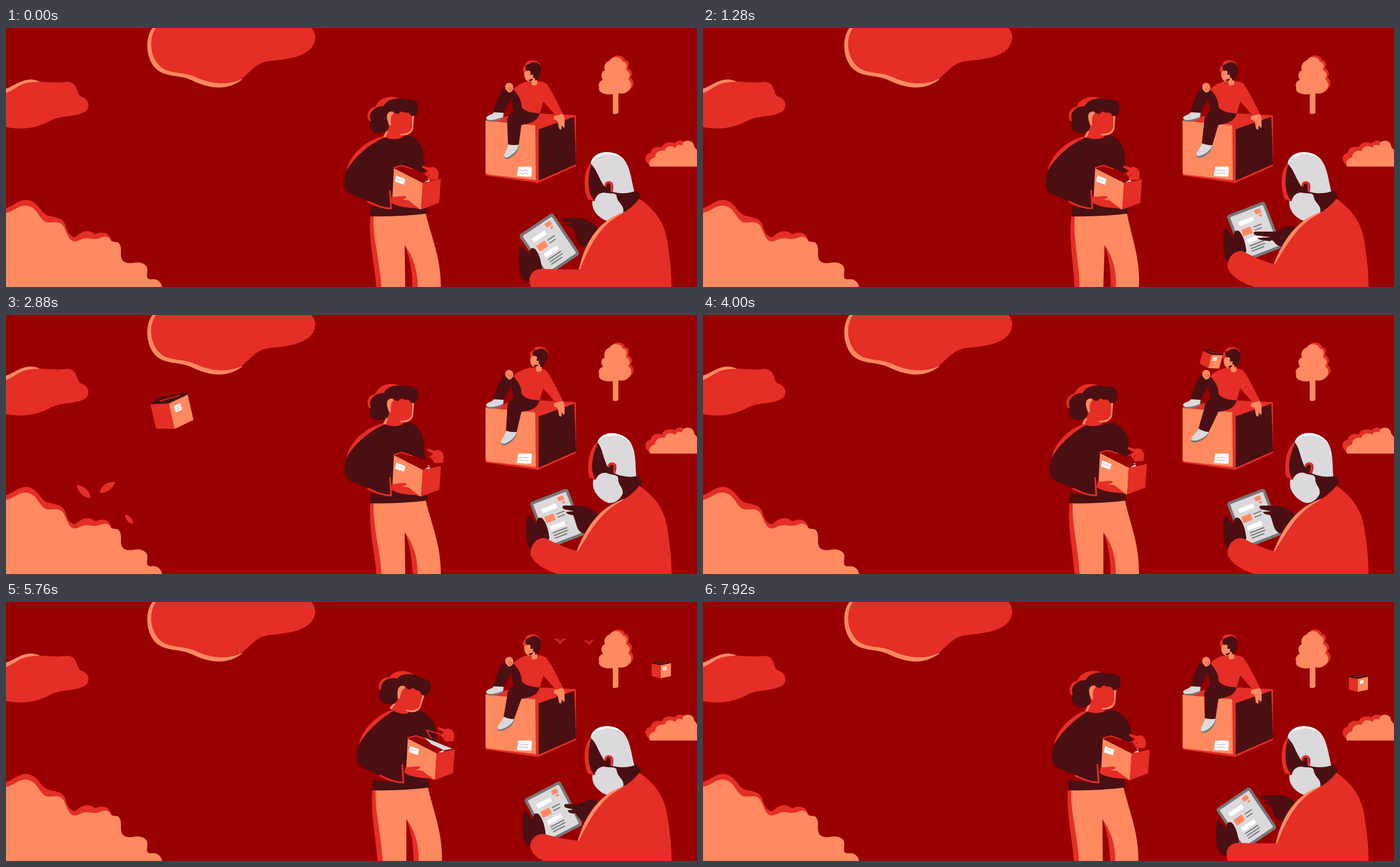
These frames come from a looping animation (1222 px wide and 458 px high, 8000 ms). An HTML page:

```html
<!DOCTYPE html>
<html lang="en">
<head>
<meta charset="utf-8">
<title>Parcels</title>
<style>
  html, body { margin: 0; width: 100%; height: 100%; overflow: hidden; background: #900; }
  svg { display: block; width: 100vw; height: 100vh; }
  .b { fill: #900; } .r { fill: #e52e25; } .p { fill: #ff8a60; } .d { fill: #4a0f12; }
  .g { fill: #dcd9dd; } .w { fill: #fff; } .s { fill: #777; }
  .line { fill: none; stroke-width: 2; stroke-linecap: round; stroke-linejoin: round; }
  .lr { stroke: #e52e25; } .lp { stroke: #ff8a60; } .ls { stroke: #777; } .lg { stroke: #aaa5aa; }
</style>
</head>
<body>
<svg viewBox="0 0 1222 458" preserveAspectRatio="none">
  <defs>
    <path id="canopy" d="M1072 117C1060 119 1046 114 1049 105C1046 98 1052 92 1056 92C1050 84 1054 76 1059 75C1056 66 1062 58 1068 58C1070 49 1088 49 1091 60C1098 60 1099 68 1096 74C1104 78 1105 86 1100 90C1107 96 1107 104 1103 108C1098 116 1090 117 1082 115Z"/>
    <path id="leaf" class="r" d="M-13 -12C-3 -11 11 -4 11 13C0 11 -11 3 -13 -12Z"/>
    <path id="bird" d="M-11 -3C-6 -5 -2 -3 0 0C2 -3 6 -5 11 -3C6 -2 4 3 0 5C-4 3 -6 -2 -11 -3Z" fill="#cf271f"/>
  </defs>

  <!-- clouds -->
  <path class="p" d="M259 0C245 18 247 55 265 72C282 88 308 82 330 93C355 105 388 114 418 91L300 0Z"/>
  <path class="r" d="M265 0C251 20 255 52 273 68C290 83 315 76 338 88C365 100 393 101 416 91C440 70 445 60 470 58C500 55 547 50 547 15C546 8 543 3 540 0Z"/>
  <path class="p" d="M0 107C15 103 25 91 45 91C55 92 62 96 66 97L0 120Z"/>
  <path class="r" d="M0 115C15 110 25 97 45 96C70 93 85 99 108 95C130 96 122 119 135 122C150 128 148 145 138 149C120 158 100 154 80 163C60 175 30 182 0 175Z"/>

  <g id="birds"><use href="#bird"/><use href="#bird"/></g>
  <g id="tree">
    <use href="#canopy" class="r" x="4" y="-3"/>
    <use href="#canopy" class="p"/>
    <path class="p" d="M1073 110H1083V150Q1078 154 1073 151Z"/>
  </g>
  <path class="r" d="M1140 243C1128 238 1128 222 1140 221C1142 208 1155 210 1160 211C1162 201 1178 201 1182 204C1190 195 1202 200 1202 206L1160 243Z"/>
  <path class="p" d="M1139 245C1134 236 1142 230 1148 229C1148 218 1158 216 1165 217C1168 207 1178 208 1184 212C1187 204 1192 207 1196 208C1196 196 1217 196 1217 210Q1220 213 1222 216V245Z"/>

  <!-- seated figure on the crate -->
  <path class="r" d="M848 163L920 150L1005 154Q1008 154 1008 157L1008 244L941 274L850 261Q847 261 848 257Z"/>
  <path class="p" d="M848 164L936 172L937 269L852 259Q848 258 848 254Z"/>
  <path class="d" d="M942 179L1005 157Q1007 200 1008 241L942 270Z"/>
  <path class="w" d="M906 245H928Q930 246 930 248L929 263L905 262Q903 262 904 259Z"/>
  <path class="line lg" d="M908 252q2 -2 4 0t4 0t4 0t4 0M908 257q2 -2 4 0t4 0t4 0t4 0" style="stroke-width:1"/>
  <path class="d" d="M880 107Q893 97 908 116L920 150L900 158L893 125L880 151L862 148C868 130 873 115 880 107Z"/>
  <path class="s" d="M850 162L880 153L879 160C868 166 852 168 850 162Z"/>
  <path class="g" d="M863 149L880 150L879 157C868 162 852 165 849 160C849 154 858 155 863 149Z"/>
  <g id="shin">
    <path class="s" d="M908 205C910 214 903 226 890 232C885 233 883 230 883 227Z"/>
    <path class="g" d="M891 203L908 203C909 212 901 223 889 229C882 231 881 225 885 220Z"/>
    <path class="d" d="M886 160L889 206Q898 208 908 206L912 168Z"/>
  </g>
  <path class="d" d="M944 148C942 167 924 169 908 172C895 182 883 168 888 158C895 144 910 143 920 143Z"/>
  <path class="r" d="M897 108C905 100 917 94 930 93C940 94 950 94 955 98C966 112 975 132 985 152L973 156C966 148 958 138 950 130L944 151C930 150 918 148 912 140C912 128 906 118 897 108Z"/>
  <path class="p" d="M883 102C886 94 896 96 897 104L897 109C894 114 888 116 887 112Q882 109 883 102Z"/>
  <path class="line lr" d="M888 106L892 111M891 104L895 109" style="stroke-width:1"/>
  <path class="p" d="M969 156L984 152C990 158 987 162 988 174L986 177L983 172L982 180L978 178L976 167Q974 162 969 162Z"/>
  <g id="boyHead">
    <path class="p" d="M920 70C916 77 916 82 917 86C919 94 925 96 929 94L930 101Q936 103 940 99L937 82Z"/>
    <path class="r" d="M919 76C913 86 912 66 919 66C917 56 940 53 945 66L930 75Z"/>
    <path class="d" d="M921 76C916 68 920 64 925 64C931 57 945 60 945 70C948 77 944 84 940 91L936 93C936 89 934 87 932 88L932 82Q929 84 927 82C929 76 926 74 921 76ZM924 92L932 89Q931 94 926 94Z"/>
  </g>

  <!-- hedge and what jumps out of it -->
  <g id="leaves"><use href="#leaf"/><use href="#leaf"/><use href="#leaf"/></g>
  <g id="parcel">
    <path class="r" d="M-17 -11L-1 -9V15L-17 11Z"/>
    <path class="p" d="M-1 -9L17 -13V11L-1 15Z"/>
    <path class="d" d="M-17 -11L-10 -15L17 -14V-12L-1 -8Z"/>
    <path class="line lr" d="M-8 -12L10 -13" style="stroke-width:.8"/>
    <path class="w" d="M3 -5L9 -6V0L3 1Z"/>
    <path class="line lg" d="M4.500 -3L7.500 -3.500M4.500 -1L7.500 -1.500" style="stroke-width:.5"/>
  </g>
  <g id="hedge">
    <path class="r" d="M-9 320C12 319 18 304 35 304C55 304 60 325 72 331C85 335 103 334 106 352C108 358 112 369 122 370C132 362 140 356 152 361C160 368 160 361 170 362C180 362 184 368 187 377L130 400L-9 380Z"/>
    <path class="p" d="M-9 328C15 327 18 314 35 314C55 315 57 336 70 343C80 347 96 337 103 353C110 368 113 382 128 376C140 370 145 372 155 373C170 374 172 364 183 372C187 380 190 377 198 379C209 388 198 404 208 413C220 420 228 411 241 416C256 422 247 432 250 442C255 447 260 442 268 446Q275 450 276 458H-9Z"/>
  </g>

  <!-- standing figure -->
  <g id="legs">
    <path class="r" d="M644 331H700L706 384C722 405 728 430 728 458H719C718 430 714 405 705 384L664 458H655C652 420 641 375 644 331Z"/>
    <path class="p" d="M650 331L742 327C752 370 769 405 769 458H728C728 430 721 405 705 384L706 458H664C661 410 648 370 650 331Z"/>
  </g>
  <path id="rim" class="r"/>
  <path id="sweater" class="d"/>
  <path id="cuff" class="line lr" style="stroke-width:3"/>
  <g id="head">
    <path class="r" d="M673 178L668 192Q684 200 700 194L704 188L716 150H676Z"/>
    <path class="p" d="M672 183L667 192L671 194L676 182Z"/>
    <path class="p" d="M714 150L722 153L720 178C718 188 706 192 695 189L708 180Z"/>
    <path class="r" d="M676 148L718 148L718 175C716 185 706 188 692 187L678 180Z"/>
    <path class="r" d="M646 167C636 162 636 142 654 139C656 128 676 116 696 125L690 140L660 160Z"/>
    <path class="d" d="M729 140C730 129 718 125 708 127C695 121 672 126 668 138C650 138 640 152 645 163C638 175 650 187 660 186C672 187 679 178 677 172C672 158 675 150 684 147Q690 154 695 151C698 147 701 146 704 150Q713 148 716 155C725 159 731 148 729 140Z"/>
    <path class="p" d="M678 172C670 156 674 146 684 148L685 152Q679 154 681 172Z"/>
  </g>
  <g id="carton">
    <path class="b" d="M686 247L702 242L769 267L737 275Z"/>
    <path id="papers" class="g" d="M715 246L765 266L741 270Z"/>
    <path id="flap" class="line lr"/>
    <path class="g" d="M735 272L748 265L750 273Z"/>
    <path class="b" d="M686 247L699 244L749 268L737 274Z"/>
    <path class="line lr" d="M686 247L700 243L718 249"/>
    <path class="r" d="M682 302Q705 318 733 319L736 300L690 292Z"/>
    <path class="p" d="M686 248L737 274L734 321Q705 312 683 305Z"/>
    <path class="r" d="M737 274L769 267L766 309L734 321Z"/>
    <path class="r" d="M682 298C692 300 700 295 708 298Q710 301 700 303L712 305C722 313 725 315 731 319C710 318 690 316 680 308Z"/>
    <path class="w" d="M690 261L706 267L704 277L688 272Z"/>
    <path class="line lg" d="M692 267q2 0 3 1t3 1t3 1" style="stroke-width:1"/>
  </g>
  <g id="hand">
    <path class="r" d="M736 243L749 247C758 243 765 250 765 259L764 268L749 269L741 258L735 260L746 252L736 247Z"/>
    <path class="line" stroke="#900" style="stroke-width:1" d="M746 252L741 257M750 258L746 263"/>
  </g>

  <!-- reader with tablet -->
  <g id="tablet">
    <rect class="s" x="-36" y="-44" width="72" height="88" rx="5"/>
    <rect class="g" x="-31" y="-39" width="62" height="78" rx="2"/>
    <g class="p">
      <rect x="13" y="-35" width="11" height="8" rx="1"/><rect x="18" y="-25" width="5" height="4" rx="1"/>
      <rect x="-21" y="-11" width="18" height="12" rx="2"/>
    </g>
    <g class="w">
      <rect x="-21" y="-26" width="28" height="8" rx="1"/><rect x="-18" y="8" width="28" height="8" rx="1"/>
    </g>
    <path class="line ls" d="M2 -8H16M2 -2H14M-16 21H10M-16 26H10M-16 31H6"/>
  </g>
  <path id="grip" class="d" d="M911 384C904 398 907 430 911 439C916 449 926 450 930 446L948 426C946 410 943 400 936 391C929 386 924 392 926 403Q918 392 911 384Z"/>
  <path id="pointer" class="d"/>
  <g id="elderHead">
    <path class="d" d="M1036 240C1026 260 1028 290 1040 302L1085 345L1122 304C1124 290 1112 288 1108 285Z"/>
    <path class="r" d="M1036 238C1020 250 1021 285 1029 303L1040 306C1027 290 1028 262 1036 238Z"/>
    <path class="g" d="M1034 240C1038 215 1075 214 1092 232C1104 244 1106 270 1111 289C1095 294 1082 292 1073 290C1075 278 1074 270 1065 272C1058 276 1060 282 1058 280C1046 262 1045 250 1034 240Z"/>
    <path class="w" d="M1034 240C1038 214 1082 213 1095 236C1080 220 1050 217 1034 240Z"/>
    <path class="line lr" d="M1060 279C1060 272 1070 270 1071 278L1071 288" style="stroke-width:4"/>
    <path class="g" d="M1041 306C1043 296 1050 291 1058 291C1070 294 1079 290 1080 298C1082 310 1092 312 1092 323C1088 338 1076 343 1070 343C1052 340 1035 325 1037 306Z"/>
  </g>
  <path id="coatRim" class="p"/>
  <path id="coat" class="r"/>
</svg>
<script>
const DURATION = 8000;
const el = id => document.getElementById(id);
const put = (node, transform) => node.setAttribute("transform", transform);
const draw = (id, d) => el(id).setAttribute("d", d);
const mix = (a, b, k) => a + (b - a) * k;

// Smooth interpolation through [time, value] pairs, without overshoot.
function track(...keys) {
  const slope = i => (keys[i + 1][1] - keys[i][1]) / (keys[i + 1][0] - keys[i][0]);
  const tangent = i => {
    if (i === 0 || i === keys.length - 1) return 0;
    const a = slope(i - 1), b = slope(i);
    return a * b <= 0 ? 0 : 2 * a * b / (a + b);
  };
  return t => {
    if (t <= keys[0][0]) return keys[0][1];
    const i = keys.findIndex(key => key[0] > t) - 1;
    if (i < 0) return keys[keys.length - 1][1];
    const [t0, v0] = keys[i], [t1, v1] = keys[i + 1];
    const span = t1 - t0, u = (t - t0) / span, w = 1 - u;
    return v0 * w * w * (1 + 2 * u) + v1 * u * u * (3 - 2 * u)
      + span * u * w * (tangent(i) * w - tangent(i + 1) * u);
  };
}

const arm = track([0, 0], [1280, 7.5], [2800, 0], [4000, 14.5], [5600, 22], [6960, 18.5]);
const hem = track([0, 0], [1280, 7.5], [2800, 0], [4000, 4], [5760, 4], [6960, 1.5]);
const foot = track([0, 0], [1280, 2], [2800, 0], [4000, 2], [5760, 2], [6960, 1]);
const headX = track([0, 0], [1280, 7.5], [2800, 0], [4000, 3.5], [5600, 11], [6960, 9]);
const headTurn = track([4000, 0], [5300, 14], [5800, 14], [6960, 3], [7920, 0]);
const handX = track([0, 0], [1280, 7.5], [2880, 9], [4000, 15], [5700, 28], [6960, 18]);
const handY = track([1280, 0], [2880, -7], [4000, -10], [5700, -22], [6960, -10]);
const opening = track([4700, 0], [5500, 1], [5900, 1], [6600, 0]);

const boyX = track([1800, 0], [2600, 8], [3200, 8], [4000, 4], [4900, 0]);
const boyTurn = track([1800, 0], [2600, 11], [3200, 11], [4000, 2], [4900, 0]);
const raise = track([0, 0], [900, 1], [5200, 1], [5760, .5], [6320, 0]);
const tipX = track([0, 985], [1280, 975], [2800, 985], [4000, 985], [5760, 988], [6960, 985], [7920, 987]);
const tipY = track([0, 339], [1200, 363], [1700, 363], [2800, 340], [4000, 340], [5600, 361], [6960, 343], [7920, 345]);
const lookUp = track([1350, 0], [2300, .95], [4000, 1], [4300, 1], [5100, 0]);

const parcel = {
  x: track([2500, 88], [2880, 293], [3440, 595], [4000, 898], [4400, 1085], [4900, 1159]),
  y: track([2500, 420], [2880, 172], [3440, 90], [4000, 79], [4200, 16], [4400, 68], [4900, 76], [5760, 120], [6120, 144]),
  size: track([2500, 2.1], [2880, 2], [4000, 1.05], [4900, 1]),
  turn: track([2500, -40], [2880, -13], [4000, 15], [4900, 0])
};
const birds = [
  { x: track([4900, 1078], [5760, 980], [6950, 880]), y: track([4900, 88], [5760, 69], [6900, -25]), size: 1 },
  { x: track([5000, 1080], [5760, 1031], [7000, 940]), y: track([5000, 88], [5760, 71], [6950, -25]), size: .85 }
];
const leaves = [
  { x: 138, y: 312, turn: 0, size: 1, drift: -.01 },
  { x: 179, y: 304, turn: -78, size: 1, drift: .01 },
  { x: 218, y: 361, turn: 8, size: .65, drift: .02 }
];
const shake = (t, from, length) => {
  const u = (t - from) / length;
  return u > 0 && u < 1 ? Math.sin(u * 6 * Math.PI) * (1 - u) : 0;
};

function drawWoman(t) {
  const a = arm(t), h = hem(t), f = foot(t), n = (a + h) / 2;
  const lean = (f - h) / 128;
  put(el("legs"), `matrix(1 0 ${lean} 1 ${f - lean * 458} 0)`);
  draw("rim", `M${670 + n} 191C${640 + a} 196 ${608 + a} 222 ${602 + a} 252L${640 + a} 240L${680 + n} 194Z`);
  draw("sweater", `M${673 + n} 192C${645 + a} 203 ${616 + a} 227 ${602 + a} 253
    C${594 + a} 280 ${600 + a} 290 ${612 + a} 295C${635 + a} 303 ${655 + a} 316 ${680 + a} 319
    L${645 + h} 315L${644 + h} 333Q${700 + h} 334 ${745 + h} 328L${741 + h} 300
    C${742 + a} 280 ${742 + a} 255 ${739 + a} 232C${738 + a} 205 ${725 + n} 192 ${712 + n} 190
    Q${692 + n} 199 ${673 + n} 192Z`);
  draw("cuff", `M${640 + a} 307C${655 + a} 314 ${665 + a} 319 ${681 + a} 319L${679 + a} 288`);
  put(el("head"), `translate(${headX(t)} 0) rotate(${headTurn(t)} 685 190)`);
  put(el("carton"), `translate(${a + .15 * (a - h)} ${-.36 * (a - h)})`);
  put(el("hand"), `translate(${handX(t)} ${handY(t)})`);
  const o = opening(t);
  el("papers").style.opacity = o;
  el("flap").style.opacity = o;
  draw("flap", `M727 ${mix(252, 247, o)}L719 ${mix(250, 233, o)}L743 ${mix(256, 240, o)}`);
}

function drawElder(t) {
  const r = raise(t), k = lookUp(t), x = tipX(t), y = tipY(t);
  put(el("tablet"), `translate(${mix(961, 975, r)} ${mix(383, 360, r)}) rotate(${mix(-34, -21, r)})`);
  put(el("grip"), `translate(${13 * r} ${-31 * r})`);
  draw("pointer", `M1048 354C1035 342 1020 ${y - 4} 1012 ${y - 3}L${x + 3} ${y - 3}
    C${x - 3} ${y - 3} ${x - 2} ${y + 3} ${x + 4} ${y + 4}L1005 ${y + 7}L${x + 6} ${y + 8}
    Q${x + 4} ${y + 12} 1003 ${y + 14}C1010 370 1008 386 1026 387L1042 378Z`);
  put(el("elderHead"), `translate(${2 * k} ${-4 * k}) rotate(${9 * k} 1110 300)`);
  const elbowX = mix(1015, 1011, r), elbowY = mix(427, 418, r);
  draw("coatRim", `M${elbowX - 2} ${elbowY}C1022 385 1045 340 1094 325L1110 320L1030 ${elbowY}Z`);
  draw("coat", `M1120 302C1150 322 1166 348 1170 380C1176 420 1177 440 1177 458H${mix(928, 975, r)}
    Q${mix(926, 938, r)} ${mix(454, 446, r)} ${mix(926, 928, r)} ${mix(442, 425, r)}
    C${mix(929, 926, r)} ${mix(430, 404, r)} ${mix(938, 942, r)} ${mix(425, 392, r)} ${mix(950, 955, r)} ${mix(426, 395, r)}
    Q${mix(980, 985, r)} ${mix(427, 411, r)} ${elbowX} ${elbowY}C1032 385 1050 350 1085 331Q1108 318 1120 302Z`);
}

function render(t) {
  drawWoman(t);
  drawElder(t);
  const swing = Math.cos(2 * Math.PI * (.48 + (t - 6960) / 1520));
  put(el("shin"), `rotate(${10 * (1 - swing)} 898 167)`);
  put(el("boyHead"), `translate(${boyX(t)} ${-boyX(t) / 8}) rotate(${boyTurn(t)} 935 96)`);
  put(el("tree"), `rotate(${3 * shake(t, 4360, 800)} 1078 152)`);
  put(el("hedge"), `translate(${2.5 * shake(t, 2250, 630)} 0)`);

  el("parcel").style.visibility = t < 2500 ? "hidden" : "visible";
  put(el("parcel"), `translate(${parcel.x(t)} ${parcel.y(t)}) rotate(${parcel.turn(t)}) scale(${parcel.size(t)})`);
  birds.forEach((bird, i) => {
    const flap = .8 + .3 * Math.cos((t - 5760) / 70);
    put(el("birds").children[i], `translate(${bird.x(t)} ${bird.y(t)}) scale(${bird.size} ${bird.size * flap})`);
  });
  const dt = t - 2880;
  el("leaves").style.visibility = dt > -500 && dt < 900 ? "visible" : "hidden";
  leaves.forEach((leaf, i) => put(el("leaves").children[i],
    `translate(${leaf.x + leaf.drift * dt} ${leaf.y - .02 * dt + .0003 * dt * dt}) rotate(${leaf.turn + dt * .04}) scale(${leaf.size} ${leaf.size * .95})`));
}

function tick() {
  render(performance.now() % DURATION);
  requestAnimationFrame(tick);
}
tick();
</script>
</body>
</html>
```
